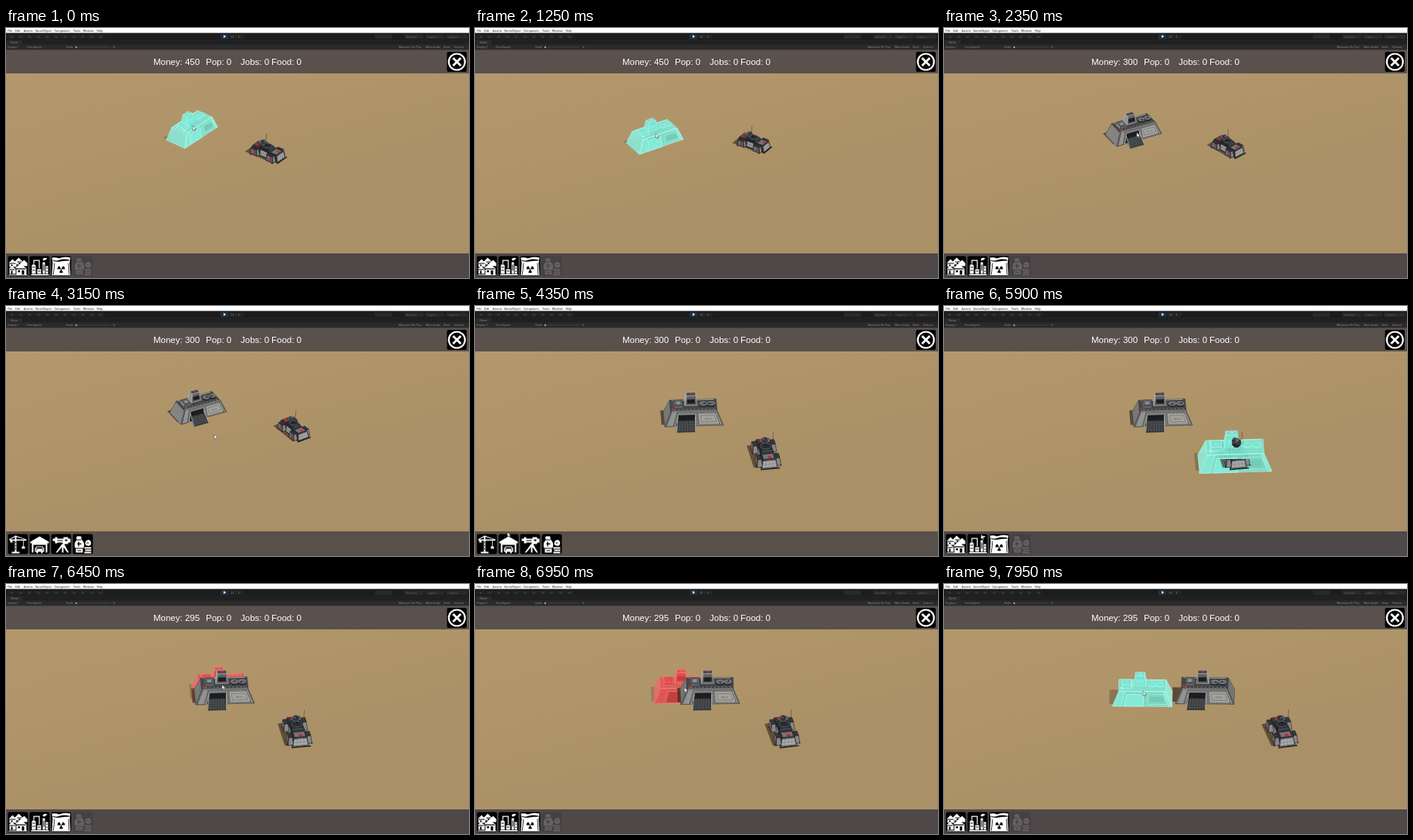
Write an HTML page with a canvas that moves like this. It is 600 by 325 pixels and loops after 8000 ms.

```html
<!DOCTYPE html>
<html lang="en">
<head>
<meta charset="utf-8">
<title>Colony builder</title>
<style>
html, body { margin: 0; width: 100%; height: 100%; overflow: hidden; background: #b0956a; }
canvas { display: block; width: 600px; height: 325px; }
</style>
</head>
<body>
<canvas id="stage" width="600" height="325"></canvas>
<script>
const ctx = document.getElementById('stage').getContext('2d');
const LOOP = 8000, STEP = 50, PLACED = 2200, PICKED = 5500, BAR_TOP = 293;
const SANS = '"Liberation Sans", Arial, sans-serif';
const UI_FONT = 'Roboto, sans-serif';

// Each row: time, then values.
const tracks = {
  cursor: [[0, 242, 127], [1250, 234, 137], [2200, 246, 130], [3150, 270, 167], [3450, 270, 167],
    [4300, 42, 294], [4400, 42, 294], [4800, 15, 307], [5000, 15, 307], [5250, 46, 305],
    [5900, 48, 297], [6000, 48, 297], [6450, 280, 131], [6700, 276, 133], [7650, 258, 139]],
  yaw: [[0, -50], [1250, -32], [2200, -28], [3150, -27], [4250, -3], [6500, -3], [7650, 1]],
  zoom: [[0, 0.9], [1250, 0.88], [3150, 0.9], [4250, 1]],
  base: [[2200, 245, 138], [3150, 249, 138], [4250, 283, 146], [6500, 283, 146], [7650, 338, 146]],
  rover: [[0, 339, 165, -52], [1250, 361, 153, -56], [2200, 367, 157, -46], [3150, 373, 164, -34],
    [4250, 377, 197, -10], [6500, 377, 197, -10], [7650, 438, 197, -14]]
};

function at(rows, t) {
  const i = rows.findIndex(r => r[0] > t);
  if (i === 0) return rows[0].slice(1);
  if (i < 0) return rows[rows.length - 1].slice(1);
  const a = rows[i - 1], b = rows[i], u = (t - a[0]) / (b[0] - a[0]);
  return a.slice(1).map((v, k) => v + (b[k + 1] - v) * u);
}

function rect(x, y, w, h, color) { ctx.fillStyle = color; ctx.fillRect(x, y, w, h); }

function text(str, x, y, size, color, family = UI_FONT) {
  ctx.font = `${size}px ${family}`;
  ctx.fillStyle = color;
  ctx.fillText(str, x, y);
}

function poly(points, fill, stroke, width = 0.6) {
  ctx.beginPath();
  points.forEach(p => ctx.lineTo(p[0], p[1]));
  ctx.closePath();
  if (fill) { ctx.fillStyle = fill; ctx.fill(); }
  if (stroke) { ctx.strokeStyle = stroke; ctx.lineWidth = width; ctx.stroke(); }
}

function line(a, b, color, width) {
  ctx.beginPath();
  ctx.moveTo(a[0], a[1]);
  ctx.lineTo(b[0], b[1]);
  ctx.strokeStyle = color;
  ctx.lineWidth = width;
  ctx.stroke();
}

function disc(x, y, rx, ry, fill, stroke, width = 0.8) {
  ctx.beginPath();
  ctx.ellipse(x, y, rx, ry, 0, 0, Math.PI * 2);
  if (fill) { ctx.fillStyle = fill; ctx.fill(); }
  if (stroke) { ctx.strokeStyle = stroke; ctx.lineWidth = width; ctx.stroke(); }
}

const mix = (a, b, u) => [a[0] + (b[0] - a[0]) * u, a[1] + (b[1] - a[1]) * u];

function grid(q, cols, rows, color, width = 0.5) {
  for (let i = 1; i < cols; i++) line(mix(q[0], q[1], i / cols), mix(q[3], q[2], i / cols), color, width);
  for (let i = 1; i < rows; i++) line(mix(q[0], q[3], i / rows), mix(q[1], q[2], i / rows), color, width);
}

// Ground-plane view: x to the right, y toward the viewer, z up.
function view(cx, cy, degrees, zoom) {
  const a = degrees * Math.PI / 180, c = Math.cos(a), s = Math.sin(a);
  const k = zoom * (1 + (cy - 145) * 0.004);
  const project = (x, y, z = 0) =>
    [cx + k * (x * c - y * s), cy + k * ((x * s + y * c) * 0.55 - z * 0.83)];
  project.scale = k;
  return project;
}

function box(P, [x0, x1, y0, y1, z0, z1], [insetX, insetY], colors, edge, mesh) {
  const ring = (dx, dy, z) =>
    [P(x0 + dx, y1 - dy, z), P(x1 - dx, y1 - dy, z), P(x1 - dx, y0 + dy, z), P(x0 + dx, y0 + dy, z)];
  const low = ring(0, 0, z0), top = ring(insetX, insetY, z1);
  for (let i = 0; i < 4; i++) {
    const j = (i + 1) % 4;
    if (low[j][0] <= low[i][0]) continue;
    const q = [low[i], low[j], top[j], top[i]];
    poly(q, i === 0 ? colors[0] : colors[1], edge);
    if (mesh) grid(q, 14, 6, mesh);
  }
  poly(top, colors[2], edge);
  if (mesh) grid(top, 16, 5, mesh);
}

function shadow(P, w, d, shift, alpha) {
  const pts = [P(-w, d), P(w, d), P(w, -d), P(-w, -d)];
  const k = P.scale;
  poly(pts.map(p => [p[0] - shift * k, p[1] - 2 * k]), `rgba(48,36,22,${alpha})`);
}

const steel = {
  front: '#7c7c7b', side: '#929290', deck: '#47494b', edge: '#393b3d', dark: '#1b1d20', ramp: '#36393c',
  rampLine: '#777a7c', panel: '#a3a19b', trim: '#b9b8b4', red: '#b23a42', block: '#606365',
  mesh: '#26282a40', shade: 0.65, open: true
};
const teal = {
  front: '#76e3cfe0', side: '#83e8d7e0', deck: '#78e6d4e0', edge: '#b4fcef', dark: '#86ecdce0',
  rampLine: '#b4fff0', panel: '#72c9b4e0', trim: '#a8fdee', red: '#9bf2e4', block: '#7ae2d0', mesh: '#c0fff24a', shade: 0.28
};
const warn = {
  front: '#d94a4ad0', side: '#de5552d0', deck: '#dc4e50d0', edge: '#f2686a', dark: '#bf393dd0',
  rampLine: '#f2787a', panel: '#df7670d0', trim: '#ff8584', red: '#f25b5f', block: '#db4d50', mesh: '#ff9d965e', shade: 0.2
};

function drawBase(x, y, yaw, zoom, c, t) {
  const P = view(x, y, yaw, zoom), k = P.scale;
  const wall = (u, z) => P(u * (1 - z * 0.0105), 18 - z * 0.2, z);
  const plate = (a, b, lo, hi) => [wall(a, lo), wall(b, lo), wall(b, hi), wall(a, hi)];
  const roof = (a, b, y0, y1, z = 21) => [P(a, y1, z), P(b, y1, z), P(b, y0, z), P(a, y0, z)];
  shadow(P, 35, 17, 7, c.shade);
  box(P, [-38, 38, -18, 18, 0, 20], [8, 4], [c.front, c.side, c.deck], c.edge, c.mesh);

  // Buttresses, doorway and ramp
  [[-36, -27], [34, 37]].forEach(([a, b]) => poly(plate(a, b, 0, 20), c.side, c.edge));
  poly(plate(-24, 2, 0, 16), c.dark, c.trim, 0.7);
  if (c.open) {
    const ramp = [wall(-23, 8), wall(1, 8), P(1, 32), P(-23, 32)];
    poly(ramp, c.ramp, c.dark);
    grid(ramp, 7, 5, c.rampLine, 0.35);
    line(wall(-24, 13), ramp[3], c.trim, 0.8);
    line(wall(2, 13), ramp[2], c.trim, 0.8);
  }
  poly(plate(8, 33, 3, 16), c.panel, c.trim, 0.7);
  poly(plate(10, 31, 5, 14), null, c.edge, 0.35);
  if (c.open) {
    const p = wall(15, 8);
    ctx.save();
    ctx.translate(p[0], p[1]);
    ctx.rotate(yaw * 0.01);
    text('HB-01', 0, 0, 3.3 * k, '#59635b', SANS);
    ctx.restore();
  }

  // Roof machinery
  line(P(-29, 13, 20), P(29, 13, 20), c.trim, 0.8);
  line(P(-27, -13, 20), P(27, -13, 20), c.trim, 0.8);
  poly(roof(-28, -23, 5, 11), c.red);
  box(P, [-26, -13, -9, 6, 20, 24], [1, 1], [c.block, c.side, c.block], c.edge);
  poly(roof(-22, -17, -4, 2, 24), c.side);
  box(P, [-11, 5, -12, 0, 20, 34], [2, 2], [c.block, c.side, c.deck], c.trim);
  poly([P(-8, 0, 23), P(2, 0, 23), P(2, -1, 29), P(-8, -1, 29)], c.dark);
  poly(roof(-4, -1, -8, -5, 34), c.red);
  [13, 23].forEach(u => {
    const p = P(u, 1, 23);
    disc(p[0], p[1] + 1.5, 5 * k, 2.8 * k, c.dark);
    disc(p[0], p[1], 4.5 * k, 2.3 * k, c.block, c.trim, 0.6);
    const a = t / 180 + u;
    line(p, [p[0] + Math.cos(a) * 4 * k, p[1] + Math.sin(a) * 2 * k], c.dark, 1.1);
  });
  for (let u = -25; u < 28; u += 5) line(P(u, 9, 20), P(u + 2, 9, 20), c.side, 0.8);
}

function drawRover(x, y, yaw, zoom, t) {
  const P = view(x, y, yaw, zoom), k = P.scale;
  const black = '#1d1f22', gray = '#6a6c70', pale = '#a9a9aa', red = '#c22833';
  shadow(P, 11, 22, 6, 0.6);
  const pod = (u, v) => {
    line(P(u, v, 3), P(u * 1.35, v * 1.4), '#2a2c2f', 1.6 * k);
    box(P, [u - 3, u + 3, v - 6, v + 6, 1, 10], [1, 1.5], ['#86888a', '#515458', '#35383c'], black);
    const plate = (a, b) => [P(u - 3, v + a, 3), P(u - 3, v + b, 3), P(u - 2, v + b, 9), P(u - 2, v + a, 9)];
    poly(plate(-4, 0), gray);
    poly(plate(2, 4), red);
  };
  pod(10, -14);
  pod(10, 13);
  box(P, [-9, 9, -22, 23, 1, 11], [2, 2], [pale, '#303337', '#383b3f'], black);
  const flank = [P(-9, -6, 2), P(-9, 5, 2), P(-7.5, 5, 10), P(-7.5, -6, 10)];
  poly(flank, pale, black);
  grid(flank, 4, 2, '#55585c');
  pod(-10, -14);
  pod(-10, 13);

  // Nose and upper plates
  const nose = [P(-8, 23, 2), P(8, 23, 2), P(7, 21.3, 10), P(-7, 21.3, 10)];
  poly(nose, pale, black);
  grid(nose, 4, 2, '#77797d');
  line(P(-10, 24, 1), P(11, 24, 1), black, 1.4);
  poly([P(-6, 20, 11.3), P(6, 20, 11.3), P(6, 10, 11.3), P(-6, 10, 11.3)], '#737578', black);
  poly([P(-1, 20, 11.5), P(3, 20, 11.5), P(3, 15, 11.5), P(-1, 15, 11.5)], red);
  poly([P(-4, -14, 11.3), P(1, -14, 11.3), P(1, -19, 11.3), P(-4, -19, 11.3)], red);
  poly([P(3, -13, 11.3), P(7, -13, 11.3), P(7, -19, 11.3), P(3, -19, 11.3)], gray);

  // Turret, turning dish and aerial
  box(P, [-7, 7, -9, 7, 11, 14], [1.5, 1.5], ['#42454a', '#25282c', '#303338'], black);
  const hub = P(0, 0, 15), dish = P(0, -7, 18), turn = t / 420;
  disc(hub[0], hub[1], 6 * k, 3.2 * k, '#292c31', '#74777b', 0.6);
  line(hub, dish, black, 1.8);
  disc(dish[0], dish[1], (2.3 + 1.8 * Math.abs(Math.cos(turn))) * k, 3.3 * k, '#30343a', '#777a7e', 0.6);
  line(dish, [dish[0] + 4 * Math.cos(turn), dish[1] - 2], '#a7a9ac', 0.7);
  const mast = P(9, -10, 10);
  line(mast, [mast[0] + 1, mast[1] - 13 * k], '#4b4438', 0.6);
}

function drawWorld(t) {
  const sand = ctx.createLinearGradient(0, 59, 60, 294);
  sand.addColorStop(0, '#b2986c');
  sand.addColorStop(0.5, '#b0956a');
  sand.addColorStop(1, '#aa9066');
  rect(0, 59, 600, 235, sand);

  const [cx, cy] = at(tracks.cursor, t), [yaw] = at(tracks.yaw, t), [zoom] = at(tracks.zoom, t);
  const [bx, by] = at(tracks.base, t), [rx, ry, turn] = at(tracks.rover, t);
  const built = t >= PLACED, ghost = !built || t >= PICKED;
  // A picked building waits at the rover until the pointer leaves the bar.
  const [gx, gy] = cy < BAR_TOP ? [cx - 1, cy + 10] : [rx, ry + 7];
  const blocked = built && Math.abs(gx - bx) < 75 && Math.abs(gy - by) < 35;
  const over = Math.abs(gx - rx) < 50 && Math.abs(gy - ry) < 30;
  const rover = () => drawRover(rx, ry, turn, zoom, t);
  const items = [[ry, rover]];
  if (built) items.push([by, () => drawBase(bx, by, yaw, zoom, steel, t)]);
  if (ghost) items.push([gy, () => {
    drawBase(gx, gy, yaw, zoom, blocked ? warn : teal, t);
    if (!over) return;
    ctx.save();
    ctx.beginPath();
    ctx.rect(rx - 24, ry + 2, 50, 30);
    ctx.ellipse(rx + 2, ry - 20, 6, 7, 0, 0, 7);
    ctx.clip();
    rover();
    ctx.restore();
  }]);
  items.sort((a, b) => a[0] - b[0]).forEach(item => item[1]());
}

function drawEditor() {
  rect(0, 0, 600, 6.7, '#fff');
  [['File', 2], ['Edit', 12], ['Assets', 22.8], ['GameObject', 37.7], ['Component', 62.5], ['Tools', 87], ['Window', 99.8], ['Help', 117.5]]
    .forEach(([s, x]) => text(s, x, 4.6, 3.9, '#222'));
  rect(0, 6.7, 600, 22, '#262626');
  rect(0, 6.7, 600, 8.5, '#1c1c1c');
  for (let x = 2; x < 122; x += 11.5) {
    rect(x, 8.5, 10.5, 5.5, '#232323');
    rect(x + 4, 10.5, 3, 2, '#3d3d3d');
  }
  [[478, 22], [516, 25], [543, 25], [570, 28]].forEach(([x, w]) => rect(x, 8.5, w, 5.5, '#292929'));
  [['Account', 519], ['Layers', 547], ['Layout', 574]].forEach(([s, x]) => text(s, x, 12.6, 3.6, '#606060'));
  rect(278, 8, 10, 6.5, '#1b3048');
  poly([[282, 9], [285.3, 11], [282, 13]], '#e8f4ff');
  rect(289, 8.5, 19, 5.5, '#252525');
  [292, 294, 301].forEach(x => rect(x, 9.8, 1, 3, '#555'));
  rect(0, 15.5, 600, 6, '#202020');
  rect(1, 16, 20, 5.5, '#2b2b2b');
  text('Game', 6, 20.3, 3.7, '#8a8a8a');
  rect(0, 21.5, 600, 7, '#2a2a2a');
  [['Display 1', 2], ['Free Aspect', 27], ['Scale', 78], ['1x', 138], ['Maximize On Play', 509], ['Mute Audio', 544], ['Stats', 567], ['Gizmos', 581]]
    .forEach(([s, x]) => text(s, x, 26.2, 3.7, '#858585'));
  rect(94, 24.6, 41, 0.8, '#484848');
  disc(91, 25, 1.3, 1.3, '#999');
}

function drawHud(t) {
  rect(0, 28, 600, 31, '#5a504c');
  rect(0, 28, 600, 1, '#494342');
  const money = t < PLACED ? 450 : t < 6200 ? 300 : 295;
  [[`Money: ${money}`, 191], ['Pop: 0', 259], ['Jobs: 0', 304], ['Food: 0', 344]]
    .forEach(([s, x]) => text(s, x, 48, 11.5, '#fff', SANS));
  ctx.beginPath();
  ctx.roundRect(571.5, 31, 25.5, 26, 2);
  ctx.fillStyle = '#000';
  ctx.fill();
  disc(584.3, 44, 10.5, 10.5, null, '#fff', 2.2);
  line([579.3, 39], [589.3, 49], '#fff', 2.8);
  line([589.3, 39], [579.3, 49], '#fff', 2.8);
}

// Pictograms on a 26-pixel tile: white shapes, then black details.
const icons = {
  houses: ['M1 9L6 4L11 9V14H2V9ZM9 7L14 2L19 7V11H12ZM17 9L21 5L25 9V13H18ZM1 17L5 13L10 17V23H2V17ZM9 16L16 10L24 16V24H11V16ZM1 24H25V25H1Z',
    'M2 9H10V10H2ZM4 11h2v2h-2zM12 7H18V8H12ZM14 8.5h2v2h-2zM2 17H9V18H2ZM4 19h2v4h-2zM10 16H23V17.2H10ZM13 18.5h2.5v2.5h-2.5zM18 18.5h3v5.5h-3z'],
  plant: ['M3 12Q5 9 8 12V23H3ZM10 17H15V23H10ZM17 8H20V23H17ZM21 13H24V23H21ZM2 23.5H25V25H2ZM5 5H6.2V10H5ZM5 5H13V6.2H5ZM12 5H13.2V16H12ZM17 4Q19 1 23 3Q22 5 18 6Z',
    'M4 14h3v1h-3zM4 18h3v1h-3zM11 19h3v1h-3zM18 11h1v8h-1zM22 15h1v1.5h-1zM22 19h1v1.5h-1z'],
  reactor: ['M1 2Q6 1 10 3Q17 0 25 2L24 9L25 25H1L2 9Z',
    'M2 5Q6 7 11 5T24 5V6Q17 6 12 7Q6 8 2 6ZM13 17L8 17A5 5 0 0 1 10.5 12.7ZM13 17L15.5 12.7A5 5 0 0 1 18 17ZM13 17L15.5 21.3A5 5 0 0 1 10.5 21.3ZM4 9h.8l-1.5 15h-.8zM22 9h.8l1 15h-.8z'],
  food: ['M5 6Q4 2 8 3Q12 2 11 6L13 9Q16 13 14 18H3Q1 12 5 8ZM17 9q4-3 6 0q2 4-1 6q-4 1-6-2ZM15 17h9v2h-9zM16 20h8v2h-8zM4 19h9v5h-9zM15 23h9v2h-9z',
    'M5 7h6v1h-6zM6 12h5v1.4h-5zM7 10h1.3v6h-1.3zM6 21h5v1h-5zM18 11h3v1h-3z'],
  crane: ['M9 2H11V24H9ZM2 7H24V8.5H2ZM10 2L24 7H22L10 3.2L3 7H1ZM3 8H6V11H3ZM19.5 8H20.3V16H19.5ZM18 16H22V19H18ZM5 23H15V25H5Z',
    'M9.6 10h.8v2h-.8zM9.6 14h.8v2h-.8zM9.6 18h.8v2h-.8z'],
  garage: ['M1 10L13 3L25 10V12H1ZM3 12H5V24H3ZM21 12H23V24H21ZM5 11H21V14H5ZM9 16H17L19 19V23H17V25H15V23H11V25H9V23H7V19Z',
    'M9.5 17h7l1 2h-9zM8 20h2v1h-2zM16 20h2v1h-2z'],
  gun: ['M2 6H5V4H8V6H16V4H22V6H25V11H22V13H15V11H8V12H5V9H2ZM14 13H17L23 24H21L16 17V24H14V17L8 24H6Z',
    'M8 8h7v1h-7zM18 7h3v2h-3z']
};
const menus = [['houses', 'plant', 'reactor', 'food'], ['crane', 'garage', 'gun', 'food']];

function drawBar(t) {
  const fade = (start, len) => Math.min(1, Math.max(0, (t - start) / len));
  const warm = fade(2400, 250) - fade(4950, 250);
  const tone = (a, b) => Math.round(a + (b - a) * warm);
  rect(0, BAR_TOP, 600, 325 - BAR_TOP, `rgb(${tone(79, 88)},${tone(72, 80)},${tone(72, 74)})`);
  const main = t >= 2500 && t < 4900;
  menus[main ? 1 : 0].forEach((name, i) => {
    const off = !main && i === 3;
    ctx.save();
    ctx.translate(2.5 + i * 28, 296.5);
    ctx.beginPath();
    ctx.roundRect(0, 0, 26, 26, 2);
    ctx.fillStyle = off ? '#454142' : '#000';
    ctx.fill();
    ctx.fillStyle = off ? '#666162' : '#fff';
    ctx.fill(new Path2D(icons[name][0]));
    ctx.fillStyle = off ? '#454142' : '#000';
    ctx.fill(new Path2D(icons[name][1]));
    ctx.restore();
  });
}

function drawCursor(t) {
  const [x, y] = at(tracks.cursor, t);
  const shape = [[0, 0], [0, 6], [1.4, 4.8], [2.4, 7], [3.5, 6.5], [2.5, 4.4], [4.3, 4.3]];
  poly(shape.map(p => [x + p[0], y + p[1]]), '#fff', '#333', 0.5);
}

function draw(now) {
  const t = Math.floor((now % LOOP) / STEP) * STEP;
  drawWorld(t);
  drawEditor();
  drawHud(t);
  drawBar(t);
  drawCursor(t);
}

const start = performance.now();
function tick() {
  draw(performance.now() - start);
  requestAnimationFrame(tick);
}
tick();
</script>
</body>
</html>
```
